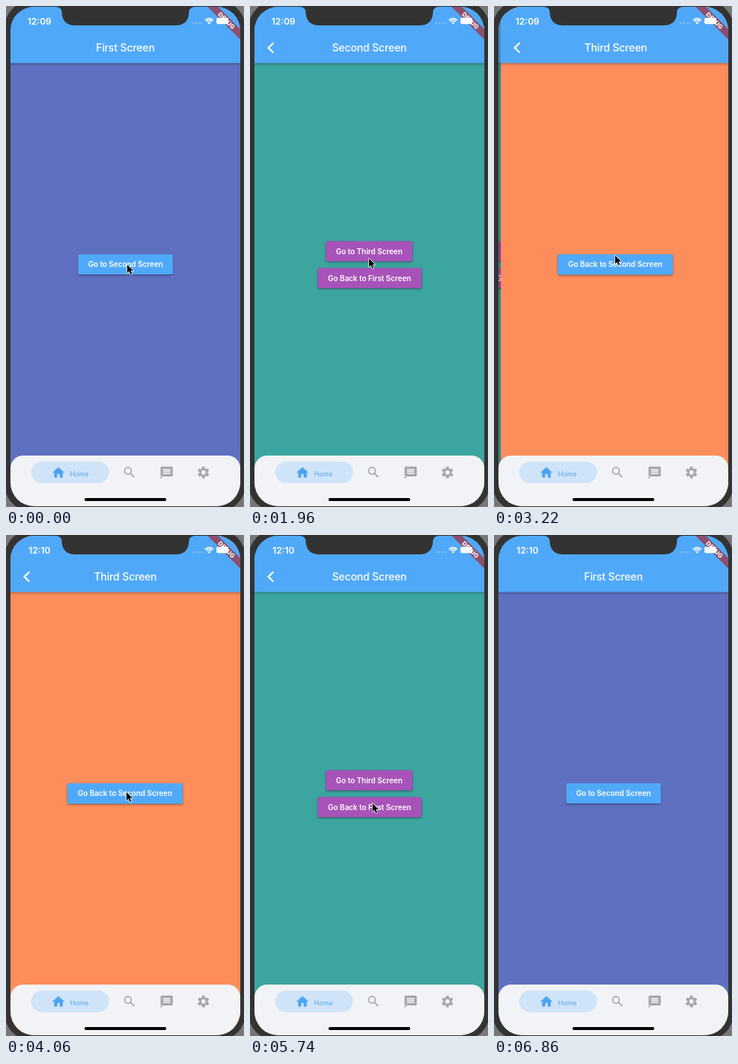
Animation of 320 by 672 pixels, one loop 6930 ms. Source, as an HTML page with a canvas:

```html
<!DOCTYPE html>
<html lang="en">
<head>
<meta charset="utf-8">
<title>Screen navigation</title>
<style>
html, body { margin: 0; width: 100%; height: 100%; overflow: hidden; background: #777; }
canvas { display: block; width: 320px; height: 672px; }
</style>
</head>
<body>
<canvas id="stage"></canvas>
<script>
const W = 320, H = 672, LOOP = 6930, STEP = 70;
const LEFT = 6, TOP = 1, WIDTH = 309, HEIGHT = 670;
const SLIDE = 400;
const BLUE = '#50a9f8', PURPLE = '#a853b9', BEZEL = '#333333';
const FONT = 'Inter, "Open Sans", sans-serif';

const canvas = document.getElementById('stage');
const ctx = canvas.getContext('2d');
const dpr = window.devicePixelRatio || 1;
canvas.width = W * dpr;
canvas.height = H * dpr;

const pages = [
  { title: 'First Screen', color: '#5f70c1', back: false, buttons: [
    { label: 'Go to Second Screen', x: 97, y: 333, w: 127.5, h: 27, color: BLUE }] },
  { title: 'Second Screen', color: '#3ca59f', back: true, buttons: [
    { label: 'Go to Third Screen', x: 102, y: 315.5, w: 116.5, h: 27, color: PURPLE },
    { label: 'Go Back to First Screen', x: 91, y: 351.5, w: 139.5, h: 27, color: PURPLE }] },
  { title: 'Third Screen', color: '#fd8d5b', back: true, buttons: [
    { label: 'Go Back to Second Screen', x: 82.5, y: 333, w: 155, h: 27.5, color: BLUE }] }
];

// Each tap slides the upper page in (push) or out (pop).
const taps = [
  { start: 1333, from: 0, to: 1, button: 0 },
  { start: 2890, from: 1, to: 2, button: 0 },
  { start: 4405, from: 2, to: 1, button: 0 },
  { start: 5900, from: 1, to: 0, button: 1 }
];

// time, x, y
const pointer = [
  [0, 163, 347], [600, 163, 347], [1000, 156.7, 345], [1600, 156.7, 345],
  [2300, 163, 333], [3100, 163, 333], [3600, 162, 345], [4760, 162, 345],
  [5400, 164.7, 360], [6200, 164.7, 360], [6750, 335, 470], [LOOP, 335, 470]
];

const clamp = v => Math.max(0, Math.min(1, v));
const cubic = (u, a, b) => 3 * u * (1 - u) ** 2 * a + 3 * u * u * (1 - u) * b + u ** 3;

function easeOut(t) {
  t = clamp(t);
  if (t === 0 || t === 1) return t;
  let lo = 0, hi = 1;
  for (let i = 0; i < 24; i++) {
    const mid = (lo + hi) / 2;
    if (cubic(mid, 0.35, 0.33) < t) lo = mid; else hi = mid;
  }
  return cubic(lo, 0.91, 0.97);
}

function pointerAt(t) {
  const i = pointer.findIndex(k => k[0] > t);
  const a = pointer[i - 1], b = pointer[i];
  const u = (t - a[0]) / (b[0] - a[0]);
  const e = u * u * (3 - 2 * u);
  return [a[1] + (b[1] - a[1]) * e, a[2] + (b[2] - a[2]) * e];
}

function roundRect(x, y, w, h, r, color) {
  ctx.beginPath();
  ctx.roundRect(x, y, w, h, r);
  ctx.fillStyle = color;
  ctx.fill();
}

function circle(x, y, r, color) {
  ctx.beginPath();
  ctx.arc(x, y, r, 0, 2 * Math.PI);
  ctx.fillStyle = color;
  ctx.fill();
}

function text(str, x, y, size, weight, color = '#fff', align = 'center', spacing = 0) {
  ctx.font = `${weight} ${size}px ${FONT}`;
  ctx.letterSpacing = spacing + 'px';
  ctx.textAlign = align;
  ctx.fillStyle = color;
  ctx.fillText(str, x, y);
}

function polyline(points, color, width) {
  ctx.beginPath();
  points.forEach(p => ctx.lineTo(...p));
  ctx.strokeStyle = color;
  ctx.lineWidth = width;
  ctx.stroke();
}

function drawButton(b, page, index, t) {
  ctx.save();
  ctx.shadowColor = 'rgba(0,0,0,0.38)';
  ctx.shadowBlur = 3 * dpr;
  ctx.shadowOffsetY = 1.2 * dpr;
  roundRect(b.x, b.y, b.w, b.h, 1.7, b.color);
  ctx.restore();
  const tap = taps.find(p => p.from === page && p.button === index);
  const age = tap ? t - tap.start + 60 : -1;
  if (age > 0 && age < 450) {
    ctx.save();
    ctx.beginPath();
    ctx.roundRect(b.x, b.y, b.w, b.h, 1.7);
    ctx.clip();
    ctx.globalAlpha = clamp((450 - age) / 250);
    ctx.fillStyle = 'rgba(80,80,120,0.09)';
    ctx.fill();
    const [px, py] = pointerAt(tap.start);
    circle(px, py, 8 + age * 0.33, 'rgba(80,80,120,0.12)');
    ctx.restore();
  }
  text(b.label, b.x + b.w / 2, b.y + 17, 9.95, 600);
}

function drawPage(index, shift, t) {
  const page = pages[index];
  ctx.save();
  ctx.translate(shift, 0);
  ctx.beginPath();
  ctx.rect(LEFT, TOP, WIDTH, HEIGHT);
  ctx.clip();
  ctx.fillStyle = page.color;
  ctx.fillRect(LEFT, TOP, WIDTH, HEIGHT);
  const shade = ctx.createLinearGradient(0, 76.5, 0, 81);
  shade.addColorStop(0, 'rgba(0,0,0,0.3)');
  shade.addColorStop(0.4, 'rgba(0,0,0,0.1)');
  shade.addColorStop(1, 'rgba(0,0,0,0)');
  ctx.fillStyle = shade;
  ctx.fillRect(LEFT, 76.5, WIDTH, 5);
  ctx.fillStyle = BLUE;
  ctx.fillRect(LEFT, TOP, WIDTH, 75.5);
  if (page.back) polyline([[31.4, 49.5], [24.7, 56], [31.4, 62.5]], '#fff', 2.3);
  text(page.title, 160.5, 61, 14, 500, '#fff', 'center', -0.12);
  page.buttons.forEach((b, i) => drawButton(b, index, i, t));
  ctx.restore();
}

function drawEdgeShadow(x, strength) {
  const g = ctx.createLinearGradient(x - 15.5, 0, x, 0);
  [[0, 0], [0.3, 0.016], [0.6, 0.07], [1, 0.22]].forEach(([stop, a]) =>
    g.addColorStop(stop, `rgba(0,0,0,${a * strength})`));
  ctx.fillStyle = g;
  ctx.fillRect(x - 15.5, TOP, 15.5, HEIGHT);
}

function drawPages(t) {
  const tap = taps.filter(p => p.start <= t).pop();
  if (!tap) return drawPage(0, 0, t);
  const s = (t - tap.start) / SLIDE;
  if (s >= 1) return drawPage(tap.to, 0, t);
  const push = tap.to > tap.from;
  const shown = push ? easeOut(s) : 1 - easeOut(s);
  const shadow = push ? shown : easeOut(1 - s);
  const x = WIDTH * (1 - shown);
  drawPage(Math.min(tap.from, tap.to), -shown * WIDTH / 3, t);
  drawEdgeShadow(LEFT + x, shadow);
  drawPage(Math.max(tap.from, tap.to), x, t);
}

function drawIcon(x, y, color, draw) {
  ctx.save();
  ctx.translate(x, y);
  ctx.scale(0.824, 0.824);
  ctx.fillStyle = ctx.strokeStyle = color;
  draw();
  ctx.restore();
}

function homeIcon() {
  ctx.fill(new Path2D('M-2 8v-6h4v6h5v-8h3L0-9-10 0h3v8z'));
}

function searchIcon() {
  ctx.lineWidth = 2;
  ctx.beginPath();
  ctx.arc(-2.5, -2.5, 5.5, 0, 2 * Math.PI);
  ctx.stroke();
  polyline([[1.6, 1.6], [7.8, 7.8]], ctx.strokeStyle, 2.2);
}

function chatIcon() {
  ctx.beginPath();
  ctx.roundRect(-10, -10, 20, 16, 2);
  ctx.moveTo(-10, 4);
  ctx.lineTo(-10, 10);
  ctx.lineTo(-6, 6);
  ctx.fill();
  ctx.fillStyle = '#f1f3f6';
  [-6, -3, 0].forEach(y => ctx.fillRect(-6, y, 12, 2));
}

function gearIcon() {
  const points = [];
  for (let i = 0; i < 6; i++) {
    const a = i * Math.PI / 3 + Math.PI / 6 + Math.PI / 3;
    [[-0.37, 7], [-0.22, 9.8], [0.22, 9.8], [0.37, 7]].forEach(([d, r]) =>
      points.push([r * Math.cos(a + d), r * Math.sin(a + d)]));
  }
  ctx.beginPath();
  points.forEach(p => ctx.lineTo(...p));
  ctx.closePath();
  ctx.moveTo(3.5, 0);
  ctx.arc(0, 0, 3.5, 0, 2 * Math.PI);
  ctx.fill('evenodd');
}

function drawNav() {
  roundRect(LEFT, 603, WIDTH, 70, [17, 17, 0, 0], '#f1f3f6');
  roundRect(34, 611, 104.5, 29, 14.5, '#cfe4f8');
  drawIcon(70.5, 626, '#4ba4f0', homeIcon);
  text('Home', 86, 630.5, 9, 400, '#58aaf0', 'left');
  drawIcon(166, 625.5, '#a6a7a9', searchIcon);
  drawIcon(216, 626, '#a6a7a9', chatIcon);
  drawIcon(265.5, 625.7, '#a6a7a9', gearIcon);
  roundRect(105.5, 660, 110, 4, 2, '#000');
}

function drawBanner() {
  ctx.save();
  ctx.translate(296.5, 19.5);
  ctx.rotate(Math.PI / 4);
  ctx.fillStyle = 'rgba(172,36,42,0.66)';
  ctx.fillRect(-33, -5, 66, 10);
  text('DEBUG', 0, 3, 8, 800);
  ctx.restore();
}

function drawStatus(t) {
  text(t < 3500 ? '12:09' : '12:10', 45, 24.5, 12, 600);
  for (let i = 0; i < 4; i++) circle(251 + i * 4, 23, 0.9, 'rgba(255,255,255,0.45)');
  ctx.strokeStyle = '#fff';
  ctx.lineWidth = 1.8;
  [7.3, 4.5].forEach(r => {
    ctx.beginPath();
    ctx.arc(273, 24.3, r, -Math.PI * 0.76, -Math.PI * 0.24);
    ctx.stroke();
  });
  ctx.beginPath();
  ctx.moveTo(273, 24.5);
  ctx.arc(273, 24.5, 2.6, -Math.PI * 0.76, -Math.PI * 0.24);
  ctx.fillStyle = '#fff';
  ctx.fill();
  roundRect(283, 15.7, 16, 8.5, 2, '#fff');
}

function drawNotch() {
  ctx.fillStyle = BEZEL;
  ctx.fill(new Path2D('M66 0V1Q75 1 75 9Q76 26 93 26H228Q245 26 246 9Q246 1 255 1V0Z'));
}

function drawPointer(t) {
  const [x, y] = pointerAt(t);
  ctx.save();
  ctx.translate(x, y);
  const arrow = new Path2D('M0 0V11.2L2.6 8.8 4.5 13 6.4 12.1 4.6 8.1H8.1Z');
  ctx.lineJoin = 'round';
  ctx.strokeStyle = '#fff';
  ctx.lineWidth = 1.5;
  ctx.stroke(arrow);
  ctx.fillStyle = '#000';
  ctx.fill(arrow);
  ctx.restore();
}

function render(t) {
  ctx.setTransform(dpr, 0, 0, dpr, 0, 0);
  ctx.fillStyle = '#777';
  ctx.fillRect(0, 0, W, H);
  roundRect(-1.5, -6, 323, 683, 34, BEZEL);
  ctx.save();
  ctx.beginPath();
  ctx.roundRect(LEFT, TOP, WIDTH, HEIGHT, 32);
  ctx.clip();
  drawPages(t);
  drawNav();
  drawBanner();
  drawStatus(t);
  ctx.restore();
  drawNotch();
  drawPointer(t);
}

let origin = null;
function tick(now) {
  if (origin === null) origin = now;
  const t = (now - origin) % LOOP;
  render(Math.floor(t / STEP) * STEP);
  requestAnimationFrame(tick);
}
render(0);
requestAnimationFrame(tick);
</script>
</body>
</html>
```
